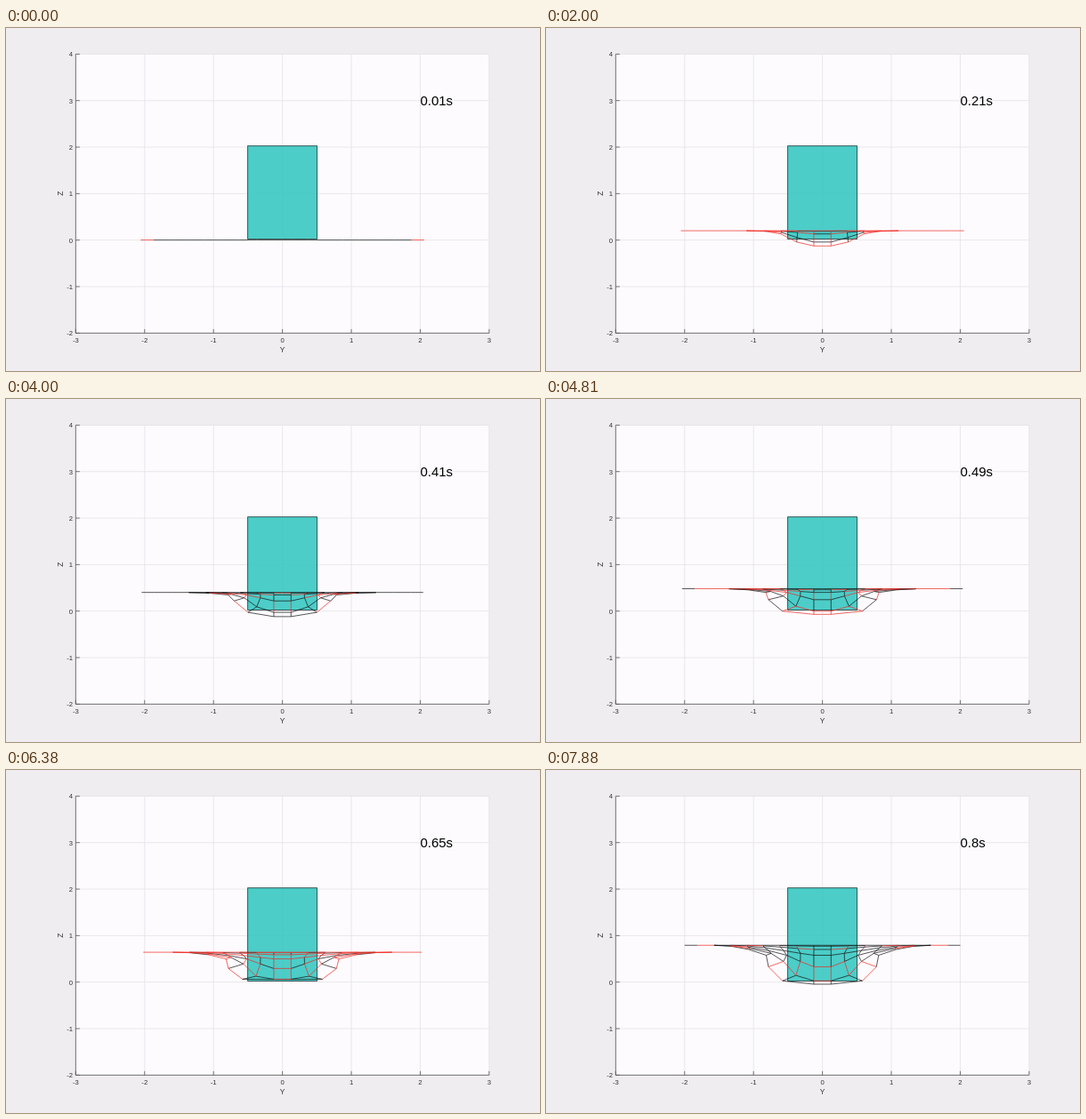
Recreate the animation shown at these times as an HTML page. Size 600x386 px, loop 8 s.

```html
<!DOCTYPE html>
<html lang="en">
<head>
<meta charset="utf-8">
<title>Net contact, side view</title>
<style>
html, body { margin: 0; width: 100%; height: 100%; overflow: hidden; background: #efedf0; }
svg { display: block; width: 600px; height: 386px; font-family: "Liberation Sans", Arial, sans-serif; }
</style>
</head>
<body>
<svg viewBox="0 0 600 386">
  <rect width="600" height="386" fill="#efedf0"/>
  <rect x="78.3" y="29.5" width="464.5" height="314" fill="#fdfbfe"/>
  <path id="grid" fill="none" stroke="#e5e3e6" stroke-width=".8"/>
  <rect x="271.6" y="132.7" width="77.9" height="104.8" fill="#3bc9c3" fill-opacity=".91" stroke="#2f4b4b" stroke-width=".9"/>
  <path id="axes" fill="none" stroke="#555" stroke-width=".8"/>
  <g id="labels" font-size="7.7" fill="#333"></g>
  <g fill="none" stroke-width=".7" stroke-linejoin="round">
    <path id="slack" stroke="#111"/>
    <path id="taut" stroke="#f02820"/>
  </g>
  <text id="clock" x="465.5" y="86.7" font-size="14.9" fill="#000"></text>
</svg>
<script>
const $ = id => document.getElementById(id);
const CX = 310.6, SX = 77.42, Z0 = 238.7, SZ = 52.33;
const px = y => CX + y * SX, pz = z => Z0 - z * SZ;

function drawAxes() {
  const left = px(-3), right = px(3), top = pz(4), bottom = pz(-2);
  let grid = '', axes = `M${left} ${top}V${bottom}H${right}`, labels = '';
  const text = (x, y, s, anchor) => {
    labels += `<text x="${x}" y="${y}" text-anchor="${anchor}">${s}</text>`;
  };
  for (let v = -3; v <= 3; v++) {
    grid += `M${px(v)} ${top}V${bottom}`;
    axes += `M${px(v)} ${bottom}v-4.5`;
    text(px(v), 353.8, v, 'middle');
  }
  for (let v = -2; v <= 4; v++) {
    grid += `M${left} ${pz(v)}H${right}`;
    axes += `M${left} ${pz(v)}h4.5`;
    text(75, pz(v) + 2.8, v, 'end');
  }
  labels += `<g font-size="8.4" text-anchor="middle"><text x="${CX}" y="364.8">Y</text>
    <text transform="translate(63.6 186.3) rotate(-90)">Z</text></g>`;
  $('grid').setAttribute('d', grid);
  $('axes').setAttribute('d', axes);
  $('labels').innerHTML = labels;
}

const RADIUS = .5;
const rest = n => .125 + .25 * n;
const bell = (x, mid, width) => Math.exp(-(((x - mid) / width) ** 2));

function ease(a, b, t) {
  const u = Math.min(1, Math.max(0, (t - a) / (b - a)));
  return u * u * (3 - 2 * u);
}

function noise(a, b, seed) {
  const s = Math.sin(a * 127.1 + b * 311.7 + seed * 74.7 + 9) * 43758.5453;
  return s - Math.floor(s);
}

// The net rises at unit speed; its middle bounces on the block while the rest drapes around it
function makeNode(t) {
  const plane = pz(t - .008);
  const held = .9 * SZ * (t - .01);
  const bounce = 10.5 * Math.abs(Math.sin(Math.PI * (t - .01) / .63));
  const reach = .08 + .3 * t;
  const push = ease(.34, .46, t), pull = ease(.1, .4, t);
  const shrink = .058 * (t / .8) ** 2;

  return (r, c) => {
    const y = rest(c), rho = Math.hypot(rest(r), y);
    const sag = rho < RADIUS
      ? held + bounce * (1 - (rho / RADIUS) ** 2)
      : held * Math.exp((RADIUS - rho) / reach) * (1 - ease(1, 1.7, rho));
    const near = Math.exp(-2 * r * r) * push;
    const drawn = c ? .17 * pull * bell(rho, .85, .3) * (1 - .6 * near) : 0;
    const pushed = c ? .28 * near * bell(y, .49, .21) : 0;
    const offset = y * (1 - drawn) + pushed - shrink * ease(.5, 1.9, y);
    return { x: offset * SX, y: plane + sag, sag };
  };
}

function buildNet(step) {
  const t = (step + 1) / 100, node = makeNode(t), seed = Math.floor(step / 4);
  const tension = Math.cos(2 * Math.PI * (t - .21) / .44);
  const paths = { taut: '', slack: '' };

  const line = (taut, a, b) => {
    for (const s of [-1, 1]) {
      paths[taut ? 'taut' : 'slack'] +=
        `M${(CX + s * a.x).toFixed(2)} ${a.y.toFixed(2)}L${(CX + s * b.x).toFixed(2)} ${b.y.toFixed(2)}`;
    }
  };
  const thread = (r, c, a, b) => {
    if (Math.max(a.sag, b.sag) > .3) line(noise(r, c, seed) < .45 + .25 * tension, a, b);
  };

  for (let r = 0; r < 6; r++) {
    const first = node(r, 0);
    thread(r, -1, { ...first, x: 0 }, first);
    for (let c = 0; c < 6; c++) {
      thread(r, c, node(r, c), node(r, c + 1));
      thread(r, c, node(c, r), node(c + 1, r));
    }
  }

  // Undisturbed outer rows overlap in one straight line
  let from = { ...node(7, 0), x: 0 };
  for (let c = 0; c < 8; c++) {
    const to = node(7, c);
    line(noise(7, c, seed) < .5 + .5 * tension, from, to);
    from = to;
  }
  line(t < .15 || tension > 0, from, { x: from.x + 14.2, y: from.y });
  return paths;
}

// The picture advances every 1.6 ticks of 1/16 s, rounded to whole ticks
const startOf = i => Math.round(6.25 * Math.round(1.6 * i)) * 10;

function stepAt(ms) {
  let i = 79;
  while (i > 0 && startOf(i) > ms) i--;
  return i;
}

let shown = -1;
function render(now) {
  const step = stepAt(now % 8000);
  if (step === shown) return;
  shown = step;
  const net = buildNet(step);
  $('taut').setAttribute('d', net.taut);
  $('slack').setAttribute('d', net.slack);
  $('clock').textContent = (step + 1) / 100 + 's';
}

let begin = null;
function tick(now) {
  if (begin === null) begin = now;
  render(now - begin);
  requestAnimationFrame(tick);
}

drawAxes();
render(0);
requestAnimationFrame(tick);
</script>
</body>
</html>
```
